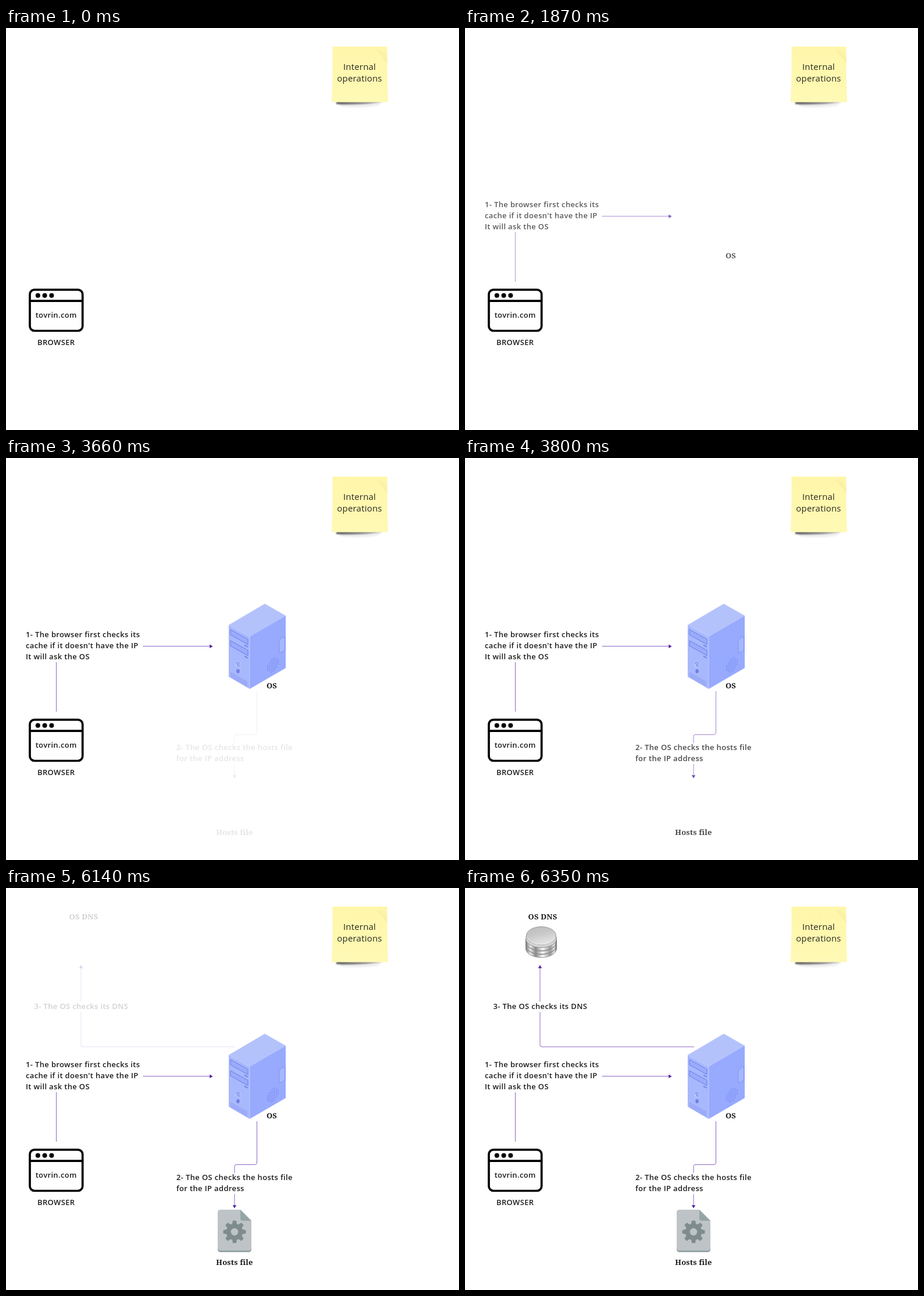
Animation of 779 by 691 pixels, one loop 8600 ms. Source, as an HTML page:

```html
<!DOCTYPE html>
<html lang="en">
<head>
<meta charset="utf-8">
<title>Name lookup</title>
<style>
  html, body { margin: 0; width: 100%; height: 100%; overflow: hidden; background: #fff; }
  svg { display: block; width: 779px; height: 691px; }
  text { font: 600 13px "Open Sans", sans-serif; letter-spacing: .35px; fill: #1c1c1c; }
  .mid { text-anchor: middle; }
  .serif { font: 700 13px "Noto Serif", serif; letter-spacing: .15px; fill: #1a1a1a; text-anchor: middle; }
  .note { font: 400 15px "Open Sans", sans-serif; letter-spacing: .2px; fill: #2a2a24; text-anchor: middle; }
  .wire { fill: none; stroke: #8d66c6; stroke-width: 1; }
  .head { fill: #4f1f9f; }
  .late, .fade { opacity: 0; }
</style>
</head>
<body>
<svg viewBox="0 0 779 691">
  <defs>
    <linearGradient id="paper" x1="0" y1="0" x2="0" y2="1">
      <stop offset="0" stop-color="#fff6a9"/>
      <stop offset="1" stop-color="#fef9b5"/>
    </linearGradient>
    <linearGradient id="curl" x1="0" y1="1" x2="1" y2="0">
      <stop offset=".45" stop-color="#f5eda0"/>
      <stop offset="1" stop-color="#fff8b4"/>
    </linearGradient>
    <linearGradient id="shade">
      <stop offset="0" stop-color="#000" stop-opacity=".6"/>
      <stop offset="1" stop-color="#000" stop-opacity=".25"/>
    </linearGradient>
    <linearGradient id="rim">
      <stop offset="0" stop-color="#777"/>
      <stop offset=".15" stop-color="#eee"/>
      <stop offset=".32" stop-color="#8a8a8a"/>
      <stop offset=".55" stop-color="#fafafa"/>
      <stop offset=".8" stop-color="#999"/>
      <stop offset=".92" stop-color="#e8e8e8"/>
      <stop offset="1" stop-color="#666"/>
    </linearGradient>
    <linearGradient id="lid" x1="0" y1="0" x2=".4" y2="1">
      <stop offset="0" stop-color="#bcbcbc"/>
      <stop offset=".5" stop-color="#c8c8c8"/>
      <stop offset="1" stop-color="#e2e2e2"/>
    </linearGradient>
    <filter id="soft" x="-20%" y="-100%" width="140%" height="300%">
      <feGaussianBlur stdDeviation="1.2"/>
    </filter>
  </defs>

  <!-- sticky note -->
  <path d="M568 125H650L642 128Q610 133 568 131Z" fill="url(#shade)" filter="url(#soft)"/>
  <path d="M573 128H648L638 134Q605 139 575 135Z" fill="#000" opacity=".06" filter="url(#soft)"/>
  <path d="M561.5 32H655.5Q655 80 657 127.5H560Q562 80 561.5 32Z" fill="url(#paper)"/>
  <path d="M636 38Q646 45 655.5 61V40Z" fill="url(#curl)"/>
  <text class="note" x="608" y="72">Internal</text>
  <text class="note" x="608" y="92">operations</text>

  <!-- browser -->
  <g fill="none" stroke="#000" stroke-width="3.7">
    <rect x="41" y="449.8" width="90.7" height="70.7" rx="8"/>
    <path d="M41 469.2H133"/>
  </g>
  <circle cx="54.8" cy="459.8" r="4"/>
  <circle cx="66.6" cy="459.8" r="4"/>
  <circle cx="78.4" cy="459.8" r="4"/>
  <text class="mid" x="86.2" y="498">tovrin.com</text>
  <text class="mid" x="86.2" y="545">BROWSER</text>

  <!-- step 1 -->
  <g class="fade">
    <text x="34" y="308">1- The browser first checks its</text>
    <text x="34" y="327">cache if it doesn't have the IP</text>
    <text x="34" y="346">It will ask the OS</text>
    <path class="wire" d="M86.5 351V436M235.5 323.5H351"/>
    <path class="head" d="M355.5 323.7L350.3 320.5V326.9Z"/>
    <text class="serif" x="457" y="396">OS</text>
  </g>

  <!-- step 2 -->
  <g class="fade">
    <path class="wire" d="M431.5 401V472Q431.5 475.5 428 475.5H396Q393 475.5 393 478.5V490M393 526V547"/>
    <path class="head" d="M393 550.5L389.8 545.3H396.2Z"/>
    <text x="293" y="502">2- The OS checks the hosts file</text>
    <text x="293" y="521">for the IP address</text>
    <text class="serif" x="393" y="648">Hosts file</text>
  </g>

  <!-- step 3 -->
  <g class="fade">
    <path class="wire" d="M394 273H132Q129 273 129 270V213M129 195V137"/>
    <path class="head" d="M129 132.5L125.8 137.7H132.2Z"/>
    <text x="48.5" y="208">3- The OS checks its DNS</text>
    <text class="serif" x="133.5" y="54">OS DNS</text>
  </g>

  <!-- computer -->
  <g class="late">
    <path d="M445 250.5L481 271L419 307L383 287Z" fill="#b4c2fc"/>
    <path d="M383 287L419 307V397L383 376Z" fill="#a8b8fc"/>
    <path d="M419 307L481 271V361L419 397Z" fill="#98aafe"/>
    <path d="M383 287L419 307V397" fill="none" stroke="#bccaff"/>
    <g id="bays" fill="#9aabfb" stroke="#7488ea" stroke-width="1.2">
      <path d="M386 295L416 311.5V320.5L386 304Z"/>
      <path d="M410 321.5L416 324.8" stroke-width="2"/>
    </g>
    <use href="#bays" y="19"/>
    <path d="M386 367.5L415 384V393.5L386 377Z" fill="#9babf8"/>
    <ellipse cx="399" cy="355" rx="4" ry="5.2" transform="rotate(-20 399 355)" fill="#7e91ee" stroke="#ccd6ff"/>
    <path d="M397.3 353.2A2.4 2.8 0 1 0 400.9 354.2M399 351.8V355" fill="none" stroke="#e3e9ff" stroke-width=".9"/>
    <ellipse cx="399" cy="366.5" rx="2.8" ry="3.4" fill="#6c80e6"/>
    <path d="M470 314L473 310L479.5 307V331L470 335.5Z" fill="#a7b7fd" stroke="#8294f2"/>
    <g id="vent" fill="#7589ee"></g>
  </g>

  <!-- hosts file -->
  <g class="late">
    <path d="M369 556H403L422 575V621Q422 626 417 626H369Q364 626 364 621V561Q364 556 369 556Z" fill="#95a5a5"/>
    <path d="M369 553H403L422 572V618Q422 623 417 623H369Q364 623 364 618V558Q364 553 369 553Z" fill="#bdc3c7"/>
    <path d="M403 553L422 572H407Q403 572 403 568Z" fill="#95a5a5"/>
    <g id="gear" transform="translate(393 591)" fill="#7f8c8d">
      <circle r="10.3" fill="none" stroke="#7f8c8d" stroke-width="8"/>
    </g>
  </g>

  <!-- database -->
  <g class="late">
    <g id="discs" stroke="#777" stroke-width=".7"></g>
    <ellipse cx="131" cy="82" rx="25.5" ry="15.5" fill="url(#lid)" stroke="#888" stroke-width=".8"/>
    <path d="M106.5 84Q112 97 131 97T155.5 84" fill="none" stroke="#f4f4f4"/>
  </g>
</svg>
<script>
  const LOOP = 8600;
  const $ = id => document.getElementById(id);

  function add(parent, tag, attrs) {
    const el = document.createElementNS("http://www.w3.org/2000/svg", tag);
    for (const key in attrs) el.setAttribute(key, attrs[key]);
    parent.append(el);
  }

  // Vent holes: a round grid sheared onto the side of the case.
  for (let i = -3; i <= 3; i++) {
    for (let j = -3; j <= 3; j++) {
      if (i * i + j * j > 12) continue;
      add($("vent"), "ellipse", { cx: 459 + i * 3, cy: 356 + j * 3.5 - i * 1.74, rx: 0.9, ry: 1.1 });
    }
  }

  for (let i = 0; i < 8; i++) {
    add($("gear"), "path", { d: "M-4.2 -12L-3 -19.3H3L4.2 -12Z", transform: `rotate(${i * 45})` });
  }

  // Stacked discs, drawn from the bottom up.
  for (const y of [99, 93, 87]) {
    add($("discs"), "path", {
      d: `M104.5 ${y}V${y + 5}A26.5 15.5 0 0 0 157.5 ${y + 5}V${y}Z`, fill: "url(#rim)"
    });
    add($("discs"), "ellipse", { cx: 131, cy: y, rx: 26.5, ry: 15.5, fill: "#d4d4d4" });
  }

  // Held opacity steps: [time, value]
  const reveals = [
    [[1800, .36], [1870, .72], [1940, 1]],
    [[3660, .11], [3730, .45], [3800, .8], [3870, 1]],
    [[6140, .2], [6210, .55], [6280, .88], [6350, 1]]
  ];

  function play(el, steps) {
    const frames = [[0, 0], ...steps, [LOOP, 1]].map(([time, opacity]) =>
      ({ offset: time / LOOP, opacity, easing: "step-end" }));
    el.animate(frames, { duration: LOOP, iterations: Infinity });
  }

  const labels = document.querySelectorAll(".fade");
  const pictures = document.querySelectorAll(".late");
  reveals.forEach((steps, i) => {
    play(labels[i], steps);
    play(pictures[i], steps.slice(-1));
  });
</script>
</body>
</html>
```
